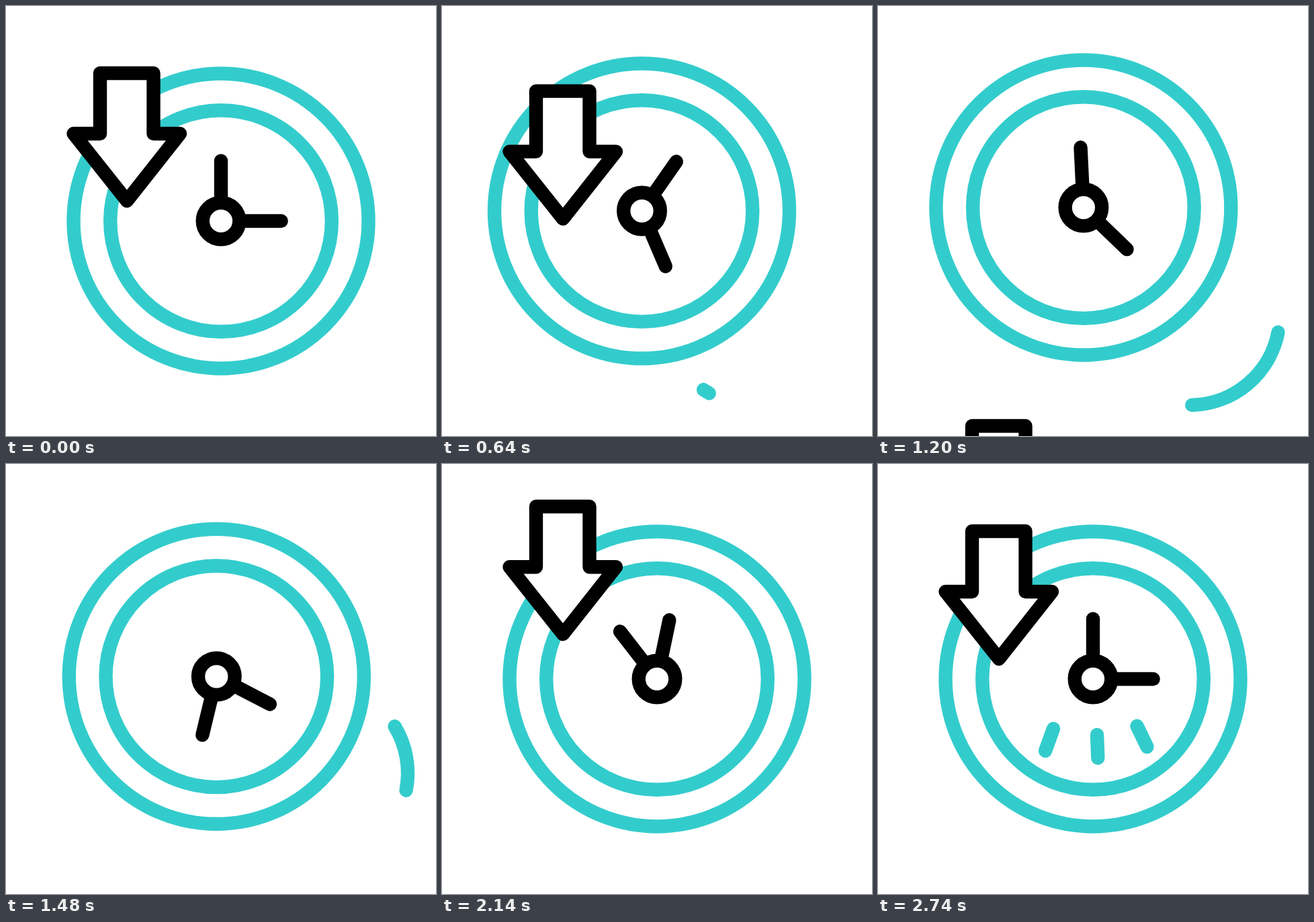
Write an HTML page with a canvas that moves like this. It is 640 px wide and 640 px high and loops after 2.76 s.

```html
<!DOCTYPE html>
<html lang="en">
<head>
<meta charset="utf-8">
<title>Clock with arrow</title>
<style>
  html, body { margin: 0; width: 100%; height: 100%; overflow: hidden; background: #fff; }
  canvas { display: block; }
</style>
</head>
<body>
<canvas id="stage" width="640" height="640"></canvas>
<script>
const ctx = document.getElementById('stage').getContext('2d');
const LOOP = 2760, TEAL = '#33cccc', BLACK = '#000', RAD = Math.PI / 180;

// Smooth curve through [time, value] keys, flat at turning points
function track(...keys) {
  const secant = i => (keys[i + 1][1] - keys[i][1]) / (keys[i + 1][0] - keys[i][0]);
  const slopes = keys.map((_, i) => {
    if (i === 0 || i === keys.length - 1) return 0;
    const a = secant(i - 1), b = secant(i);
    return a * b > 0 ? 2 * a * b / (a + b) : 0;
  });
  return t => {
    const i = keys.findIndex(k => k[0] > t);
    if (i === 0) return keys[0][1];
    if (i < 0) return keys[keys.length - 1][1];
    const [t0, v0] = keys[i - 1], [t1, v1] = keys[i];
    const d = t1 - t0, u = (t - t0) / d, w = 1 - u;
    return v0 * w * w * (1 + 2 * u) + v1 * u * u * (3 - 2 * u)
      + d * u * w * (slopes[i - 1] * w - slopes[i] * u);
  };
}

const clockX = track([180, 320], [560, 304], [640, 297.5], [720, 301.5], [920, 342.5],
  [1200, 306], [1280, 297.5], [1780, 342], [2100, 320]);
const clockY = track([180, 320], [540, 298], [640, 305], [920, 327], [1170, 299],
  [1200, 300], [1780, 328], [2100, 320]);
const hourAngle = track([180, 0], [640, 34.8], [920, 69], [1200, 133.6],
  [1780, 254.2], [2140, 322], [2660, 360]);
const minuteAngle = track([180, 90], [640, 156.6], [920, 236.8], [1200, 356.8],
  [1780, 600.6], [2140, 731.6], [2660, 810]);
const arcHead = track([540, 124], [1560, -34]);
const arcTail = track([950, 124], [1770, -34]);
const tickGrowth = track([2520, 0], [2740, 1]);

// The arrow falls out below, then comes back in from above
function arrowShift(t) {
  if (t < 1400) return 523 * (Math.max(0, t - 180) / 1020) ** 3.75;
  return -37 * (Math.max(0, 2540 - t) / 400) ** 2.55;
}

function stroke(color, path) {
  ctx.strokeStyle = color;
  ctx.beginPath();
  path();
  ctx.stroke();
}

const line = (color, x1, y1, x2, y2) => stroke(color, () => {
  ctx.moveTo(x1, y1);
  ctx.lineTo(x2, y2);
});

const ring = (color, x, y, r) => stroke(color, () => ctx.arc(x, y, r, 0, 2 * Math.PI));

function hand(x, y, degrees) {
  const dx = Math.sin(degrees * RAD), dy = -Math.cos(degrees * RAD);
  line(BLACK, x + 28 * dx, y + 28 * dy, x + 89.6 * dx, y + 89.6 * dy);
}

function clock(t) {
  const x = clockX(t), y = clockY(t);
  ring(TEAL, x, y, 219.5);
  ring(TEAL, x, y, 164.8);
  hand(x, y, hourAngle(t));
  hand(x, y, minuteAngle(t));
  ring(BLACK, x, y, 27.3);
}

function swoosh(t) {
  const from = arcTail(t), to = arcHead(t);
  if (from - to > 0.1) {
    stroke(TEAL, () => ctx.arc(464, 460, 134, from * RAD, to * RAD, true));
  }
}

function ticks(t) {
  const g = tickGrowth(t);
  if (g <= 0) return;
  for (const [x, y, dx, dy] of [[261, 394, -12, 33], [326, 403, 1.3, 34.5], [385.5, 390, 15, 31]]) {
    line(TEAL, x, y, x + dx * g, y + dy * g);
  }
}

function arrow(t) {
  const shift = arrowShift(t);
  const outline = [[140, 100], [219.5, 100], [219.5, 190], [259, 190],
    [180, 290], [100.5, 190], [140, 190]];
  ctx.fillStyle = '#fff';
  stroke(BLACK, () => {
    outline.forEach(([x, y]) => ctx.lineTo(x, y + shift));
    ctx.closePath();
    ctx.fill();
  });
}

function draw(now) {
  const t = now % LOOP;
  ctx.fillStyle = '#fff';
  ctx.fillRect(0, 0, 640, 640);
  ctx.lineWidth = 20.4;
  ctx.lineCap = ctx.lineJoin = 'round';
  clock(t);
  swoosh(t);
  ticks(t);
  arrow(t);
}

const start = performance.now();
function loop() {
  draw(performance.now() - start);
  requestAnimationFrame(loop);
}
loop();
</script>
</body>
</html>
```
